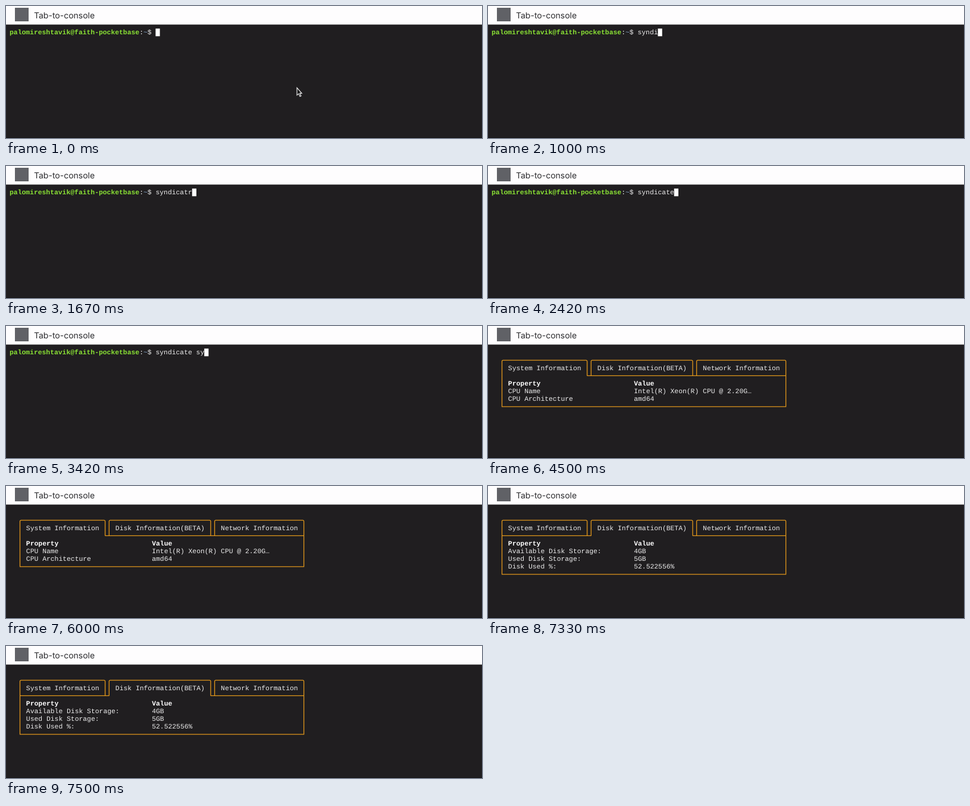
Animation of 800 by 224 pixels, one loop 8000 ms. Source, as an HTML page:

```html
<!DOCTYPE html>
<html lang="en">
<head>
<meta charset="utf-8">
<title>Terminal session</title>
<style>
  html, body { margin: 0; width: 100%; height: 100%; overflow: hidden; background: #201e20; }
  svg { display: block; width: 100vw; height: 100vh; }
  text { white-space: pre; text-rendering: geometricPrecision; }
  .mono { font: 11.36px "Liberation Mono", "Courier New", monospace; fill: #ececec; }
  .bold { font-weight: 700; fill: #fff; }
  .user { font-weight: 700; fill: #8ae234; }
  .dir { fill: #8fb0d4; }
  .title { font: 14px Inter, Roboto, sans-serif; fill: #2b2b2e; }
  .frame { fill: none; stroke: #e0961b; stroke-width: 1.3; }
</style>
</head>
<body>
<svg viewBox="0 0 800 224">
  <rect width="800" height="224" fill="#201e20"/>
  <rect y="223" width="800" height="1" fill="#121213"/>
  <rect width="800" height="31.5" fill="#fefdfe"/>
  <rect x="15" y="3" width="23" height="23" fill="#606166"/>
  <text class="title" x="47" y="21">Tab-to-console</text>

  <g id="shell">
    <text class="mono" x="6" y="48.3"><tspan class="user">palomireshtavik@faith-pocketbase</tspan>:<tspan class="dir">~</tspan>$ <tspan id="typed"></tspan></text>
  </g>
  <rect id="caret" width="7.2" height="13" fill="#fff"/>
  <path id="mouse" d="M489 138.8V151.3L491.8 148.8L494 153.6L495.9 152.7L493.8 148.1H497.2Z"
        fill="#161617" stroke="#f4f4f4" stroke-width="1.1"/>

  <g id="system"></g>
  <g id="disk"></g>
</svg>
<script>
const LOOP = 8000, CELL = 6.817, ROW = 13.1;
const CLEAR = 4170, OPEN = 4250, SWITCH = 7330, ENTER = 4000, HIDE_MOUSE = 170;

const colX = c => 6 + c * CELL;
const rowY = r => 48.3 + r * ROW;
const $ = id => document.getElementById(id);

// [time, command line content]
const typing = [
  [0, ""], [250, "s"], [420, "sy"], [830, "syn"], [920, "synd"], [1000, "syndi"],
  [1170, "syndic"], [1500, "syndica"], [1580, "syndicat"], [1670, "syndicatr"],
  [1750, "syndicatre"], [2170, "syndicatr"], [2330, "syndicat"], [2420, "syndicate"],
  [2920, "syndicate "], [3170, "syndicate s"], [3420, "syndicate sy"], [3580, "syndicate sys"]
];

const tabs = [
  { label: "System Information", left: 23.5, right: 166.6, col: 4 },
  { label: "Disk Information(BETA)", left: 173.3, right: 344, col: 26 },
  { label: "Network Information", left: 350.6, right: 500.6, col: 52 }
];

const label = (s, col, row, cls = "") =>
  `<text class="mono ${cls}" x="${colX(col) + 0.6}" y="${rowY(row)}">${s}</text>`;

function panel(active, rows) {
  const top = 58.2, mid = top + 2 * ROW, r = 2;
  const bottom = mid + ROW * (rows.length + 2);
  const { left, right } = tabs[active];
  const start = tabs[0].left, end = tabs[2].right;
  let d = "";
  for (const t of tabs) {
    d += `M${t.left} ${mid}V${top + r}Q${t.left} ${top} ${t.left + r} ${top}` +
         `H${t.right - r}Q${t.right} ${top} ${t.right} ${top + r}V${mid}`;
  }
  d += `M${start} ${mid}H${left}M${right} ${mid}H${end}`;
  d += `M${start} ${mid}V${bottom}H${end}V${mid}`;

  return `<path class="frame" d="${d}"/>` +
    tabs.map(t => label(t.label, t.col, 2)).join("") +
    label("Property", 4, 4, "bold") + label("Value", 35, 4, "bold") +
    rows.map(([key, value], i) => label(key, 4, 5 + i) + label(value, 35, 5 + i)).join("");
}

$("system").innerHTML = panel(0, [
  ["CPU Name", "Intel(R) Xeon(R) CPU @ 2.20G…"],
  ["CPU Architecture", "amd64"]
]);
$("disk").innerHTML = panel(1, [
  ["Available Disk Storage:", "4GB"],
  ["Used Disk Storage:", "5GB"],
  ["Disk Used %:", "52.522556%"]
]);

const show = (id, on) => $(id).setAttribute("visibility", on ? "visible" : "hidden");

function draw(t) {
  const line = typing.filter(([at]) => at <= t).pop()[1];
  const entered = t >= ENTER;
  $("typed").textContent = line;
  $("caret").setAttribute("x", entered ? 6 : colX(36 + line.length));
  $("caret").setAttribute("y", entered ? 38.3 + ROW : 38.3);
  show("shell", t < CLEAR);
  show("caret", t < CLEAR);
  show("mouse", t < HIDE_MOUSE);
  show("system", t >= OPEN && t < SWITCH);
  show("disk", t >= SWITCH);
}

const begin = performance.now();
function tick() {
  draw((performance.now() - begin) % LOOP);
  requestAnimationFrame(tick);
}
tick();
</script>
</body>
</html>
```
